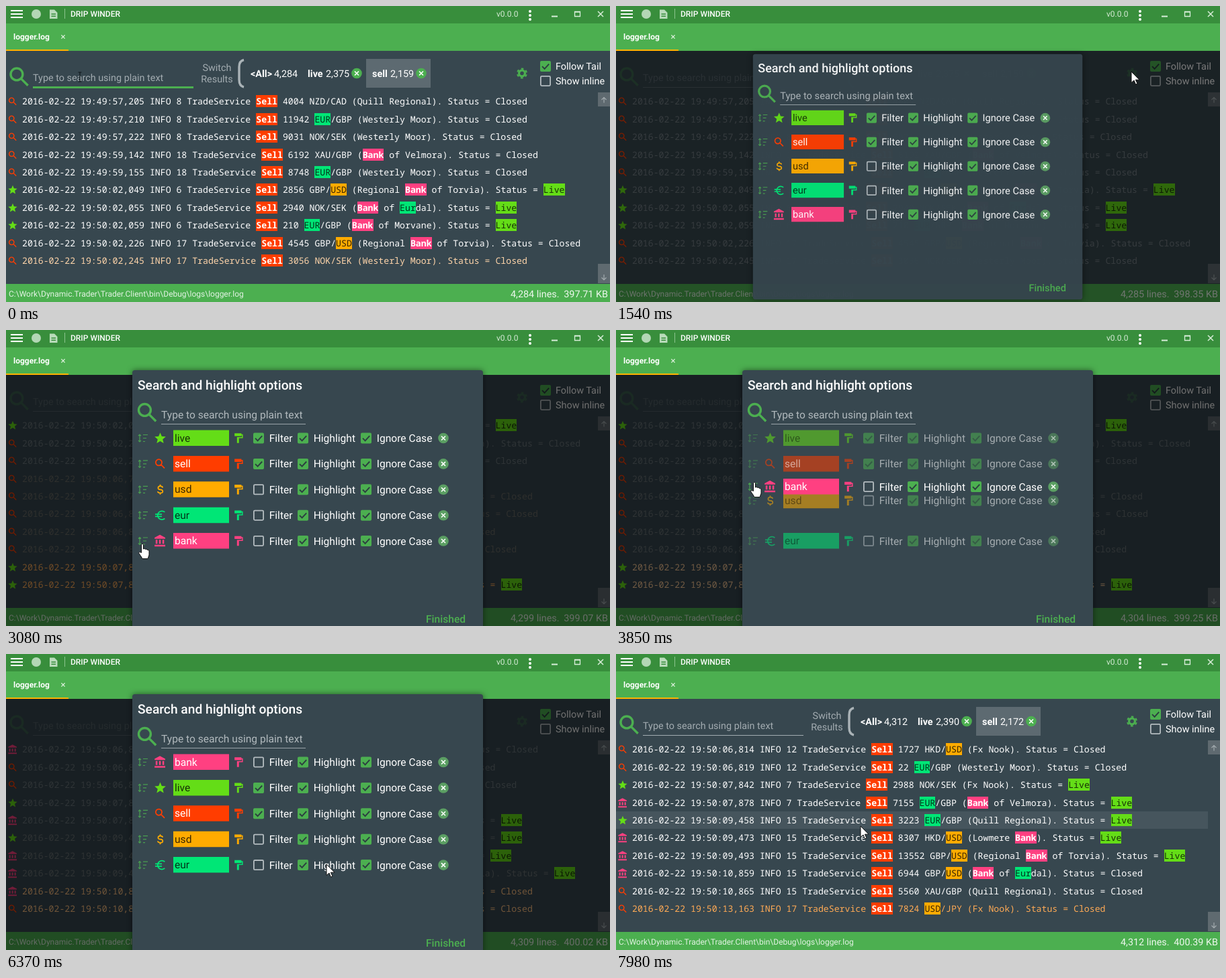
Animation of 899 by 442 pixels, one loop 8 s. Source, as an HTML page with a canvas:

```html
<!DOCTYPE html>
<html lang="en">
<head>
<meta charset="utf-8">
<title>Log viewer</title>
<style>
  html, body { margin: 0; width: 100%; height: 100%; overflow: hidden; background: #37474f; }
  canvas { display: block; }
</style>
</head>
<body>
<canvas id="stage" width="899" height="442"></canvas>
<script>
const ctx = document.getElementById('stage').getContext('2d');
const LOOP = 8000, STEP = 70;
const GREEN = '#4caf50', BACK = '#37474f', GREY = '#a3acb1', DARK = 'rgba(0,0,0,.78)';
const SANS = 'Roboto, sans-serif', MONO = '"Noto Sans Mono", monospace';
const CHAR = 7.917, ROW_H = 26.44, SLOT_H = 38.4;

const TAGS = {
  live: { color: '#64dd17', ink: DARK, icon: 'star', filter: true },
  sell: { color: '#ff3d00', ink: '#fff', icon: 'search', filter: true },
  usd: { color: '#ffab00', ink: DARK, icon: 'dollar' },
  eur: { color: '#00e676', ink: DARK, icon: 'euro' },
  bank: { color: '#ff4081', ink: '#fff', icon: 'bank' },
};

const ROWS = `49:57,205|8|4004 NZD/CAD (Quill Regional)|Closed
49:57,210|8|11942 EUR/GBP (Westerly Moor)|Closed
49:57,222|8|9031 NOK/SEK (Westerly Moor)|Closed
49:59,142|18|6192 XAU/GBP (Bank of Velmora)|Closed
49:59,155|18|8748 EUR/GBP (Westerly Moor)|Closed
50:02,049|6|2856 GBP/USD (Regional Bank of Torvia)|Live
50:02,055|6|2940 NOK/SEK (Bank of Eurdal)|Live
50:02,059|6|210 EUR/GBP (Bank of Morvane)|Live
50:02,226|17|4545 GBP/USD (Regional Bank of Torvia)|Closed
50:02,245|17|3056 NOK/SEK (Westerly Moor)|Closed
50:06,789|12|9 NOK/SEK (Fx Nook)|Closed
50:06,796|12|5127 EUR/GBP (Quill Regional)|Closed
50:06,808|12|3318 XAU/GBP (Bank of Velmora)|Closed
50:06,814|12|1727 HKD/USD (Fx Nook)|Closed
50:06,819|12|22 EUR/GBP (Westerly Moor)|Closed
50:07,842|7|2988 NOK/SEK (Fx Nook)|Live
50:07,878|7|7155 EUR/GBP (Bank of Velmora)|Live
50:09,458|15|3223 EUR/GBP (Quill Regional)|Live
50:09,473|15|8307 HKD/USD (Lowmere Bank)|Live
50:09,493|15|13552 GBP/USD (Regional Bank of Torvia)|Live
50:10,859|15|6944 GBP/USD (Bank of Eurdal)|Closed
50:10,865|15|5560 XAU/GBP (Quill Regional)|Closed
50:13,163|17|7824 USD/JPY (Fx Nook)|Closed`.split('\n').map(line => {
  const [time, thread, trade, status] = line.split('|');
  return `2016-02-22 19:${time} INFO ${thread} TradeService Sell ${trade}. Status = ${status}`;
});

// Timelines: [time, value...]
const BATCHES = [[-9999, 9], [-1400, 10], [1610, 15], [2660, 17], [4270, 20], [5460, 22], [7770, 23]];
const LINES = [[0, '4,284'], [490, '4,285'], [1610, '4,294'], [2450, '4,299'], [3500, '4,304'], [5390, '4,309'], [7000, '4,312']];
const SIZE = [[0, '397.71'], [700, '398.35'], [2450, '399.07'], [3710, '399.25'], [4200, '399.54'], [5390, '400.02'], [7350, '400.39']];
const LIVE = [[0, '2,375'], [2660, '2,380'], [7000, '2,390']];
const DIALOG = [[1190, 0], [1640, 1], [7280, 1], [7600, 0]];
const DRAG_Y = [[3080, 315], [3850, 234], [4400, 148], [4550, 161.5]];
const DRAG_DIM = [[3080, 0], [3220, 1], [4450, 1], [4550, 0]];
const POINTER = [[70, 110, 106], [840, 767, 98], [1750, 767, 98], [2450, 265, 262], [2660, 203, 319], [3080, 203, 319],
  [3850, 206, 227], [4400, 205, 146], [4760, 195, 145], [5600, 195, 145], [6370, 477, 314], [7000, 655, 428],
  [7280, 655, 428], [7910, 364, 257]];

const clamp = v => Math.min(1, Math.max(0, v));
const smooth = p => p * p * (3 - 2 * p);
const current = (keys, t) => keys.filter(k => k[0] <= t).pop()[1];

function tween(keys, t, ease = p => p) {
  const next = keys.findIndex(k => k[0] > t);
  if (next < 0) return keys[keys.length - 1].slice(1);
  const b = keys[next], a = keys[next - 1] || b;
  const p = a === b ? 0 : ease((t - a[0]) / (b[0] - a[0]));
  return a.slice(1).map((v, i) => v + (b[i + 1] - v) * p);
}

function fade(alpha, draw) {
  const before = ctx.globalAlpha;
  ctx.globalAlpha = before * alpha;
  draw();
  ctx.globalAlpha = before;
}

function rect(x, y, w, h, color, radius = 0) {
  ctx.fillStyle = color;
  ctx.beginPath();
  ctx.roundRect(x, y, w, h, radius);
  ctx.fill();
}

function disc(x, y, r, color) {
  ctx.fillStyle = color;
  ctx.beginPath();
  ctx.arc(x, y, r, 0, 7);
  ctx.fill();
}

function stroke(path, color, width = 1) {
  ctx.strokeStyle = color;
  ctx.lineWidth = width;
  ctx.stroke(new Path2D(path));
}

function text(s, x, y, size, color = '#fff', weight = 400, align = 'left', family = SANS) {
  ctx.font = `${weight} ${size}px ${family}`;
  ctx.textAlign = align;
  ctx.fillStyle = color;
  ctx.fillText(s, x, y);
}

const FILLED = {
  star: new Path2D('M12 17.3L18.2 21 16.5 14 22 9.2 14.8 8.6 12 2 9.2 8.6 2 9.2 7.5 14 5.8 21z'),
  bank: new Path2D('M4 10v7h3v-7zM10 10v7h3v-7zM2 22h19v-3H2zM16 10v7h3v-7zM11.5 1L2 6v2h19V6z'),
  roller: new Path2D('M18 4V2H4V8H18V6h1v4H9v12h4V12h8V4z'),
};
const OUTLINED = {
  search: 'M4 9.5a5.5 5.5 0 1 1 11 0a5.5 5.5 0 1 1-11 0M13.6 13.6L19.8 19.8',
  euro: 'M20.2 6.2A7.7 7.7 0 1 0 20.2 17.8M3 10h12M3 14h12',
  dollar: 'M16.5 8.6Q16 5.9 12.3 5.9T8.3 8.8T12.3 12T16.6 15.3T12.3 18.1T7.6 15.3M12 3v3M12 18v3',
};

function icon(name, x, y, size, color) {
  ctx.save();
  ctx.translate(x, y);
  ctx.scale(size / 24, size / 24);
  ctx.translate(-12, -12);
  if (OUTLINED[name]) {
    stroke(OUTLINED[name], color, 2.1);
  } else {
    ctx.fillStyle = color;
    ctx.fill(FILLED[name]);
  }
  ctx.restore();
}

function gear(x, y) {
  ctx.strokeStyle = GREEN;
  for (const [r, width, dash] of [[4.4, 3.2, []], [6.9, 2.2, [3.613, 3.613]]]) {
    ctx.setLineDash(dash);
    ctx.lineWidth = width;
    ctx.beginPath();
    ctx.arc(x, y, r, Math.PI / 12, Math.PI * 25 / 12);
    ctx.stroke();
  }
  ctx.setLineDash([]);
}

function checkbox(x, y, checked) {
  if (checked) {
    rect(x, y, 16, 16, GREEN, 2);
    stroke(`M${x + 3} ${y + 8.2}l3.6 3.6L${x + 13.2} ${y + 4.6}`, '#2c3c40', 1.9);
  } else {
    ctx.strokeStyle = '#b4bcc0';
    ctx.lineWidth = 1.8;
    ctx.beginPath();
    ctx.roundRect(x + .9, y + .9, 14.2, 14.2, 1.5);
    ctx.stroke();
  }
}

function cross(x, y, r, color, width) {
  stroke(`M${x - r} ${y - r}l${2 * r} ${2 * r}m0 ${-2 * r}l${-2 * r} ${2 * r}`, color, width);
}

function closeBadge(x, y, color) {
  disc(x, y, 7.8, color);
  cross(x, y, 3, '#fff', 1.6);
}

function header() {
  rect(0, 0, 899, 26, '#388e3c');
  rect(0, 26, 899, 41, GREEN);
  for (const y of [6, 11, 16]) rect(7, y, 18, 2, '#fff');
  disc(45, 12, 7, '#b3d7b5');
  ctx.fillStyle = '#b9dbba';
  ctx.fill(new Path2D('M65 5.5h7l4.5 4.5v9H65z'));
  stroke('M67.5 12h6.5M67.5 15.3h6.5', '#388e3c', 1.4);
  rect(87, 4, 1, 15, '#8cc48e');
  text('DRIP WINDER', 96, 16, 12, '#fff', 500);
  text('v0.0.0', 730, 16, 12, '#d3ead4');
  for (const y of [8, 14, 20]) disc(780, y, 2, '#fff');
  stroke('M812 15.5h9', '#d9eeda', 2);
  stroke('M846.5 8.5h8v7h-8zM846 9h9', '#d9eeda', 1.3);
  cross(885, 12, 4, '#d9eeda', 1.5);
  text('logger.log', 11, 50, 12, '#fff', 700);
  cross(85, 46, 2.6, '#e5f4e5', 1.3);
  rect(0, 65, 93, 2, '#ffb300');
}

function counter(label, value, x, valueX) {
  text(label, x, 106, 14.4, '#fff', 700);
  text(value, valueX, 106, 14.4);
}

function toolbar(t, dim, total) {
  fade(1 - .75 * dim, () => {
    icon('search', 20, 106, 39, GREEN);
    text('Type to search using plain text', 40, 112, 14.4, GREY);
    if (t < 210) rect(40, 120, 239, 3, GREEN);
    else rect(40, 121, 239, 1, GREY);
    text('Switch', 314, 97, 14.4, GREY, 400, 'center');
    text('Results', 314, 114, 14.4, GREY, 400, 'center');
    stroke('M354 80.5Q347 82 347 91V110Q347 119.5 354 121', '#aab3b7', 3.4);
    rect(536, 79, 96, 43, '#5d6a71');
    counter('<All>', current(LINES, t), 364, 399);
    counter('live', current(LIVE, t), 449, 476);
    counter('sell', `2,${149 + total}`, 545, 572);
    closeBadge(522, 100.5, GREEN);
    closeBadge(618, 100.5, GREEN);
    gear(768, 100.5);
  });
  checkbox(795, 82, true);
  text('Follow Tail', 818, 95, 14.4);
  checkbox(795, 104, false);
  text('Show inline', 818, 117, 14.4);
}

function logRow(row, y, age, dim, order) {
  const tag = TAGS[order.find(key => row.toLowerCase().includes(key))];
  icon(tag.icon, 10, y + .5, 16, tag.color);
  const p = clamp((age - 400) / 2000);
  const ink = `rgb(255,${170 + 85 * p},${85 + 170 * p})`;
  const alpha = 1 - .75 * dim * clamp((age - 1300) / 150);
  let x = 24;
  row.split(/(sell|usd|eur|bank|live)/i).forEach((part, i) => {
    const end = x + part.length * CHAR;
    if (i % 2) {
      const { color, ink } = TAGS[part.toLowerCase()];
      const left = Math.round(x);
      rect(left, y - 9, Math.round(end) - left, 18, color);
      text(part, x, y + 5, 13.2, ink, ink === '#fff' ? 700 : 500, 'left', MONO);
    } else {
      fade(alpha, () => text(part, x, y + 5, 13.2, ink, 500, 'left', MONO));
    }
    x = end;
  });
}

function logList(t, dim, total, pointerY) {
  const order = t < 4550 ? ['live', 'sell'] : ['bank', 'live', 'sell'];
  const hovered = dim ? -1 : Math.floor((pointerY - 129) / ROW_H);
  for (let i = 0; i < 10; i++) {
    const y = Math.round(142.2 + ROW_H * i), index = total - 10 + i;
    if (i === hovered) rect(0, y - 13, 881, 26, '#46555d');
    const arrival = BATCHES.find(b => b[1] > index)[0];
    logRow(ROWS[index], y, t - arrival, dim, order);
  }
  rect(881, 129, 18, 21, '#5f6a70');
  rect(881, 385, 18, 29, '#5f6a70');
  stroke('M890 144.5v-8m-3.5 3.5l3.5-3.5 3.5 3.5M890 401v8m-3.5-3.5l3.5 3.5 3.5-3.5', '#a3abaf', 1.2);
}

function statusBar(t) {
  rect(0, 415, 899, 27, GREEN);
  text('C:\\Work\\Dynamic.Trader\\Trader.Client\\bin\\Debug\\logs\\logger.log', 4, 434, 12, '#e3f3e4');
  text(`${current(LINES, t)} lines.`, 751, 435, 14.4, '#eef8ee');
  text(`${current(SIZE, t)} KB`, 896, 435, 14.4, '#eef8ee', 400, 'right');
}

function optionRow(name, y) {
  const { color, ink, icon: shape, filter } = TAGS[name];
  stroke(`M199 ${y - 5.5}v11m-2-9l2-2 2 2m-4 7l2 2 2-2M204 ${y - 5}h7m-7 5h5m-5 5h3`, '#4a9f50', 1.2);
  icon(shape, 229.5, y, 20, color);
  rect(249, y - 12, 83, 23.5, color);
  text(name, 251, y + 5, 15.6, ink);
  icon('roller', 346, y, 17.5, color);
  [[368, 'Filter', filter], [434, 'Highlight', true], [528, 'Ignore Case', true]].forEach(([x, label, checked]) => {
    checkbox(x, y - 8, checked);
    text(label, x + 23.7, y + 5.5, 15.6);
  });
  closeBadge(651, y, '#5b9f63');
}

function dialog(t, scale) {
  ctx.save();
  ctx.translate(449.5, 255);
  ctx.scale(scale, scale);
  ctx.translate(-449.5, -255);
  ctx.globalAlpha = scale;
  ctx.shadowColor = 'rgba(0,0,0,.5)';
  ctx.shadowBlur = 8;
  rect(188, 60, 522, 390, BACK, 4);
  ctx.shadowColor = 'transparent';

  text('Search and highlight options', 196, 89, 19.2, '#fff', 500);
  if (t >= 4760 && t < 5600) rect(191, 104, 38.5, 38, '#6c7474');
  icon('search', 210.5, 123.5, 39, GREEN);
  text('Type to search using plain text', 231, 132, 15.6, '#b2babe');
  rect(231, 140, 215, 1, '#9aa4a9');

  const [bankY] = tween(DRAG_Y, t), [dim] = tween(DRAG_DIM, t);
  fade(1 - .45 * dim, () => ['live', 'sell', 'usd', 'eur'].forEach((name, i) => {
    const slot = 161.5 + SLOT_H * i;
    const shift = t > 4400 ? 1 : clamp((slot + 3 - bankY) / 17);
    optionRow(name, slot + SLOT_H * shift);
  }));
  optionRow('bank', bankY);
  text('Finished', 625, 437, 15.6, GREEN, 500);
  ctx.restore();
}

const ARROW = new Path2D('M0 0V16.5L4 13L6.5 19L9 18L6.4 12.2H12Z');
const HAND = new Path2D('M-1.5 1.5Q0 -1 1.5 1.5V8Q3.2 6.5 4.4 8.4Q6.2 7.2 7.2 9.4Q9.2 8.5 10 11V17L8 22.5H0L-2 19L-5.5 14Q-5 11.5 -1.5 13.5Z');

function pointer(t, x, y) {
  if (t < 210) return stroke(`M${x} ${y - 7}v14m-2.5 0h5m-5 -14h5`, '#10181c', 1.2);
  const shape = t >= 2590 && t < 5600 ? HAND : ARROW;
  ctx.save();
  ctx.translate(x, y);
  ctx.fillStyle = '#fff';
  ctx.strokeStyle = '#111';
  ctx.lineWidth = 1;
  ctx.fill(shape);
  ctx.stroke(shape);
  ctx.restore();
}

function draw(t) {
  const [x, y] = tween(POINTER, t, smooth);
  const open = Math.sin(tween(DIALOG, t)[0] * Math.PI / 2);
  const total = current(BATCHES, t);
  rect(0, 0, 899, 442, BACK);
  toolbar(t, open, total);
  logList(t, open, total, y);
  statusBar(t);
  rect(0, 67, 899, 375, `rgba(0,0,0,${.56 * open})`);
  header();
  if (open) dialog(t, open);
  pointer(t, x, y);
}

const start = performance.now();
ctx.textRendering = 'geometricPrecision';
function frame() {
  const t = (performance.now() - start) % LOOP;
  draw(Math.floor(t / STEP) * STEP);
  requestAnimationFrame(frame);
}
frame();
</script>
</body>
</html>
```
